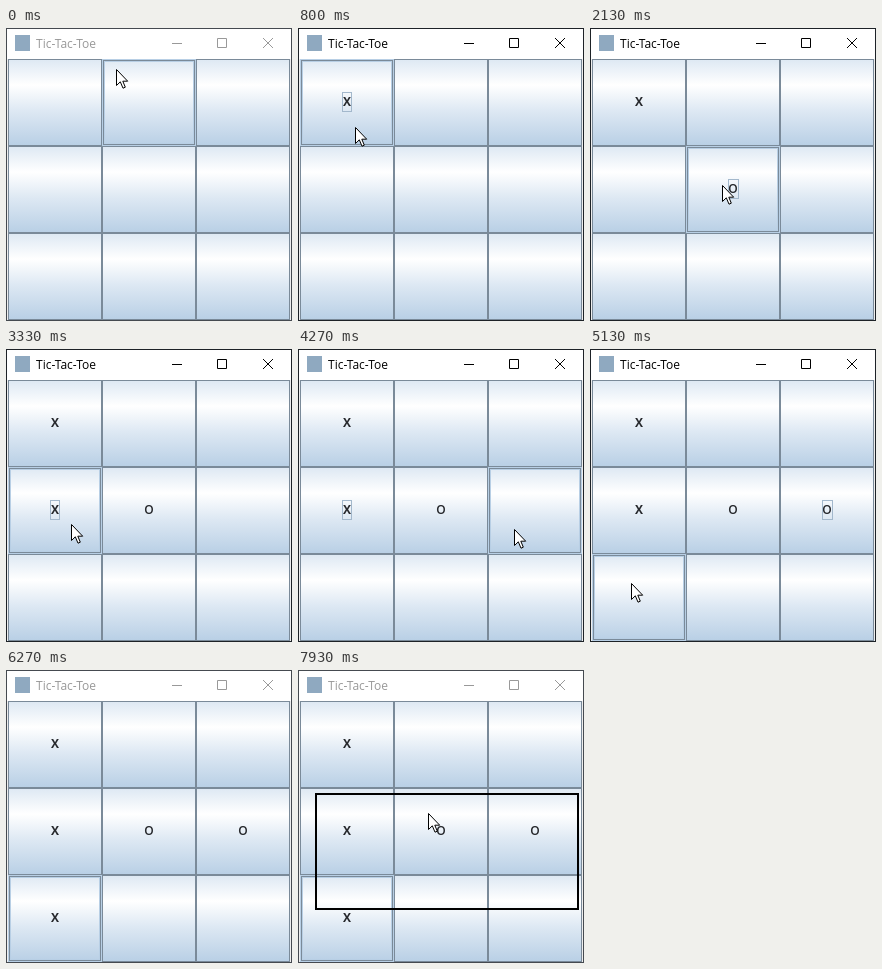
These frames come from a looping animation (286 px wide and 293 px high, 8 s). An HTML page:

```html
<!DOCTYPE html>
<html lang="en">
<head>
<meta charset="utf-8">
<title>Tic-Tac-Toe</title>
<style>
  html, body { margin: 0; width: 100%; height: 100%; overflow: hidden; }
  #stage {
    position: relative; width: 286px; height: 293px; overflow: hidden;
    background: #eee; color: #999; font: 12px "Open Sans", "Noto Sans", sans-serif;
  }
  #stage.active { color: #000; }
  #stage > * { position: absolute; }
  .bar { left: 0; top: 0; width: 286px; height: 31px; background: #fff; }
  .icon { left: 9px; top: 7px; width: 15px; height: 16px; background: #8fa9c0; }
  .title { left: 30px; top: 0; line-height: 31px; white-space: nowrap; }
  .controls { left: 0; top: 0; fill: none; stroke: currentColor; }
  .frame { inset: 0; border: 1px solid #454a50; }
  .active .frame { border-color: #1d2227; }

  .cell {
    width: 94px; height: 87px; line-height: 85px; text-align: center;
    color: #26282c; font-weight: 700;
    background: linear-gradient(#dde8f3, #fff 30%, #dde8f3 60%, #b8cfe5);
    box-shadow: inset 0 0 0 1px #7a8a99;
  }
  .cell.o { font-weight: 600; }
  .cell.hover {
    box-shadow: inset 0 0 0 1px #b8cfe5, inset 0 0 0 2px #7a8a99, inset 0 0 0 3px #b8cfe5;
  }
  .cell.pressed {
    background: #b8cfe5;
    box-shadow: inset 2px 2px #7a8a99, inset -1px -1px #7a8a99;
  }
  .cell.focus::after {
    content: ""; position: absolute; left: 42px; top: 33px;
    width: 8px; height: 18px; border: 1px solid #a3b8cc;
  }
  .cell.o.focus::after { width: 9px; }

  #ghost { left: 0; top: 0; width: 260px; height: 113px; border: 2px solid #000; }
  #pointer { left: 0; top: 0; fill: #fff; stroke: #000; }
</style>
</head>
<body>
<div id="stage">
  <div class="bar"></div>
  <div class="icon"></div>
  <div class="title">Tic-Tac-Toe</div>
  <svg class="controls" width="286" height="31">
    <path d="M166 15.5h10M211.5 10.5h9v9h-9z"/>
    <path d="M257 10l10 10M267 10l-10 10"/>
  </svg>
  <div class="frame"></div>
  <div id="ghost"></div>
  <svg id="pointer" width="14" height="21">
    <path d="M.5 .5V16.5L4.3 12.8L7 19.2L9.3 18.2L6.8 12.2H11.7Z"/>
  </svg>
</div>
<script>
  const LOOP = 8000, STEP = 200 / 3;
  const ACTIVATE = 670, GAME_OVER = 5400, LEAVE = 6270, DRAG = 7730;

  // pointer path: time, x, y
  const path = [
    [70, 110, 41], [400, 57, 99], [1070, 57, 99], [1870, 132, 157],
    [2130, 132, 157], [2600, 63, 177], [3270, 63, 177], [3330, 65, 175],
    [3930, 160, 222], [4000, 160, 222], [4270, 216, 180], [4670, 216, 180],
    [5130, 41, 234], [5200, 43, 236], [5400, 43, 236], [5530, 55, 240],
    [5670, 55, 240], [6200, 216, 252], [7730, 200, 235], [7930, 130, 143]
  ];

  const moves = [
    { cell: 0, mark: "X", down: 670, up: 800 },
    { cell: 4, mark: "O", down: 1930, up: 2000 },
    { cell: 3, mark: "X", down: 2870, up: 2930 },
    { cell: 5, mark: "O", down: 4330, up: 4470 },
    { cell: 6, mark: "X", down: 5270, up: 5400 }
  ];

  const stage = document.getElementById("stage");
  const ghost = document.getElementById("ghost");
  const pointer = document.getElementById("pointer");

  const cells = Array.from({ length: 9 }, (_, i) => {
    const el = document.createElement("div");
    el.className = "cell";
    el.style.left = 2 + 94 * (i % 3) + "px";
    el.style.top = 31 + 87 * Math.floor(i / 3) + "px";
    stage.insertBefore(el, ghost);
    return el;
  });

  function pointerAt(t) {
    const i = path.findIndex(p => p[0] >= t);
    if (i === 0) return path[0].slice(1);
    if (i < 0) return path[path.length - 1].slice(1);
    const [t0, x0, y0] = path[i - 1], [t1, x1, y1] = path[i];
    const u = (t - t0) / (t1 - t0);
    const k = t > DRAG ? u : u * u * (3 - 2 * u);
    return [Math.round(x0 + (x1 - x0) * k), Math.round(y0 + (y1 - y0) * k)];
  }

  const cellAt = (x, y) => y < 31 ? -1 :
    Math.floor((x - 2) / 94) + 3 * Math.floor((y - 31) / 87);

  const place = (el, x, y) => { el.style.transform = `translate(${x}px, ${y}px)`; };
  const show = (el, on) => { el.style.visibility = on ? "visible" : "hidden"; };

  function render(t) {
    const [x, y] = pointerAt(t);
    const active = t >= ACTIVATE && t < GAME_OVER;
    const hover = t < GAME_OVER ? cellAt(x, y) : 6;
    const last = moves.filter(m => t >= m.down).pop();

    stage.classList.toggle("active", active);
    cells.forEach((el, i) => {
      const move = moves.find(m => m.cell === i);
      const mark = move && t >= move.up ? move.mark : "";
      const latest = !!last && last.cell === i;
      if (el.textContent !== mark) el.textContent = mark;
      el.classList.toggle("o", mark === "O");
      el.classList.toggle("hover", i === hover);
      el.classList.toggle("pressed", latest && t < last.up);
      el.classList.toggle("focus", active && latest && mark !== "");
    });

    place(pointer, x, y);
    show(pointer, t < LEAVE || t >= DRAG);
    place(ghost, x - 113, y - 20);
    show(ghost, t >= DRAG);
  }

  // the screen was refreshed 15 times a second
  function tick() {
    const n = Math.floor((performance.now() % LOOP + 4) / STEP) % 120;
    render(Math.round(n * STEP / 10) * 10);
    requestAnimationFrame(tick);
  }
  tick();
</script>
</body>
</html>
```
